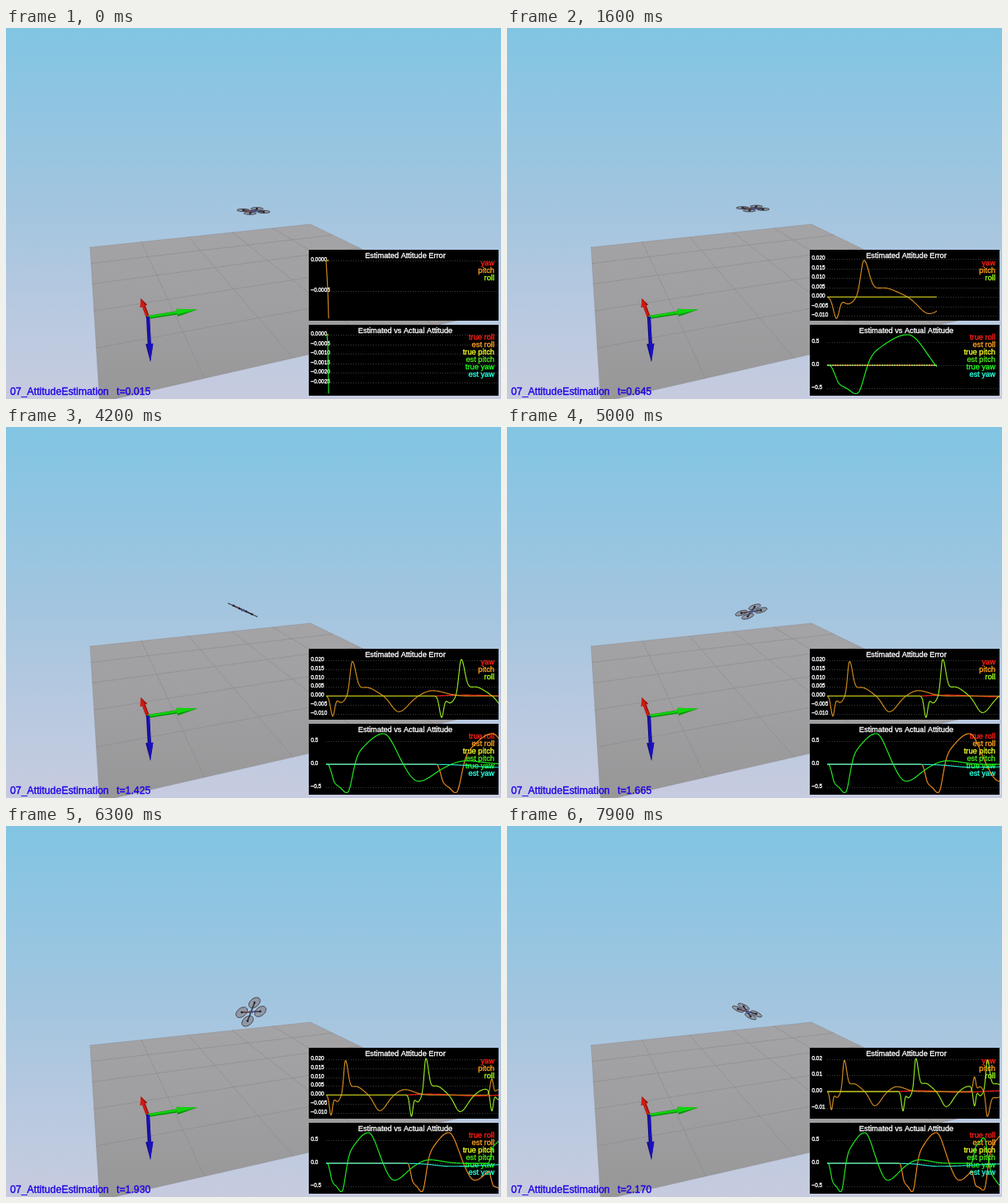
An HTML page with a canvas that plays this animation: 600 px wide and 450 px high, repeating every 8000 ms.

```html
<!DOCTYPE html>
<html lang="en">
<head>
<meta charset="utf-8">
<title>Attitude estimation</title>
<style>
  html, body { margin: 0; width: 100%; height: 100%; overflow: hidden; }
  canvas { display: block; width: 600px; height: 450px; }
</style>
</head>
<body>
<canvas id="stage" width="600" height="450"></canvas>
<script>
const ctx = document.getElementById('stage').getContext('2d');
const FONT = '"Liberation Sans", Arial, sans-serif';
const LOOP = 8000, STEP = 100;
const RED = '#ff1e14', ORANGE = '#ffa01e', LIME = '#a0ff1e',
      YELLOW = '#f0ff28', GREEN = '#1eff1e', CYAN = '#28ffdc', BLUE = '#1e00e6';

// Bell of height 1 at mid, with separate widths before and after it.
function bump(t, mid, before, after = before) {
  return Math.exp(-(((t - mid) / (t < mid ? before : after)) ** 2));
}

// Response to one attitude kick: estimation error and angle.
function errorKick(t) {
  if (t <= 0) return 0;
  return -.011 * bump(t, .055, .0255, .022) - .0038 * bump(t, .125, .045)
    + .0177 * bump(t, .216, .026, .041) + .0048 * bump(t, .33, .11)
    - .0088 * bump(t, .6, .085, .11) + .003 * bump(t, .88, .11, .14);
}

function angleKick(t) {
  if (t <= 0) return 0;
  const onset = 1 - Math.exp(-((t / .0253) ** 4));
  return onset * (-.25 * bump(t, .07, .03, .05) - .72 * bump(t, .178, .09, .055)
    + .67 * bump(t, .475, .222, .128) - .37 * bump(t, .76, .12, .18)
    + .08 * bump(t, 1.15, .13, .2));
}

// Pitch is kicked first, then roll, then both in opposite directions.
const pitchError = t => errorKick(t) - .8 * errorKick(t - 1.8);
const rollError = t => 1.06 * errorKick(t - .9) + errorKick(t - 1.8);
const yawError = t => t < .9 ? 0 : .0005 * Math.sin(6 * (t - .9));
const pitch = t => angleKick(t) - .9 * angleKick(t - 1.8);
const roll = t => angleKick(t - .9) + angleKick(t - 1.8);
const yaw = t => t < .9 ? 0 : -.065 * bump(t, 1.4, .25, .6);

// Drone centre by simulated time.
const flight = [[0, 300, 222], [.645, 298, 219], [1.125, 295, 223],
  [1.425, 287, 222], [1.665, 296, 224], [1.93, 297, 225.5], [2.18, 291, 225]];

function dronePosition(t) {
  const i = Math.max(1, flight.findIndex(key => key[0] >= t));
  const [t0, x0, y0] = flight[i - 1], [t1, x1, y1] = flight[i];
  const s = (t - t0) / (t1 - t0), ease = s * s * (3 - 2 * s);
  return [x0 + (x1 - x0) * ease, y0 + (y1 - y0) * ease];
}

// Simulated seconds: the playback slows down in stages.
function simTime(frame) {
  const part = (from, to, rate) => Math.max(0, Math.min(frame, to) - from) * rate;
  return .015 + part(0, 10, .045) + part(10, 54, .03) + part(54, 55, .025) + part(55, 80, .015);
}

function text(str, x, y, size, color, align = 'left') {
  ctx.font = `${size}px ${FONT}`;
  ctx.fillStyle = ctx.strokeStyle = color;
  ctx.textAlign = align;
  ctx.lineWidth = .35;
  ctx.fillText(str, x, y);
  ctx.strokeText(str, x, y);
}

function line(points, color, width = 1) {
  ctx.beginPath();
  points.forEach(([x, y]) => ctx.lineTo(x, y));
  ctx.strokeStyle = color;
  ctx.lineWidth = width;
  ctx.stroke();
}

function polygon(points, fill) {
  ctx.beginPath();
  points.forEach(([x, y]) => ctx.lineTo(x, y));
  ctx.closePath();
  ctx.fillStyle = fill;
  ctx.fill();
}

function gradient(y0, y1, ...colors) {
  const g = ctx.createLinearGradient(0, y0, 0, y1);
  colors.forEach((c, i) => g.addColorStop(i / (colors.length - 1), c));
  return g;
}

// Perspective map of the unit square onto the corners a, b, c, d.
function perspective([ax, ay], [bx, by], [cx, cy], [dx, dy]) {
  const x1 = bx - cx, x2 = dx - cx, x3 = ax - bx + cx - dx;
  const y1 = by - cy, y2 = dy - cy, y3 = ay - by + cy - dy;
  const den = x1 * y2 - x2 * y1;
  const g = (x3 * y2 - x2 * y3) / den, h = (x1 * y3 - x3 * y1) / den;
  return (u, v) => {
    const w = 1 + g * u + h * v;
    return [(ax + (bx - ax + g * bx) * u + (dx - ax + h * dx) * v) / w,
            (ay + (by - ay + g * by) * u + (dy - ay + h * dy) * v) / w];
  };
}
const floorPoint = perspective([102, 266], [369, 238], [590, 345], [113.5, 454]);

function drawScene() {
  ctx.fillStyle = gradient(0, 450, '#81c5e3', '#92c5e1', '#a4c5df', '#b7c9e0', '#c7cbdf');
  ctx.fillRect(0, 0, 600, 450);
  polygon([floorPoint(0, 0), floorPoint(1, 0), floorPoint(1, 1), floorPoint(0, 1)],
    gradient(238, 450, '#a4a3a6', '#9f9ea0', '#989798'));
  for (let i = 0; i <= 5; i++) {
    const k = i / 5;
    ctx.setLineDash(i % 5 ? [2, 1] : [1, 1]);
    line([floorPoint(k, 0), floorPoint(k, 1)], '#87878a', .8);
    line([floorPoint(0, k), floorPoint(1, k)], '#87878a', .8);
  }
  ctx.setLineDash([]);
}

function arrow(x, y, tipX, tipY, head, color, shade) {
  const len = Math.hypot(tipX - x, tipY - y);
  const ux = (tipX - x) / len, uy = (tipY - y) / len;
  const bx = tipX - ux * head, by = tipY - uy * head;
  const side = k => [bx - uy * k, by + ux * k];
  line([[x, y], [bx, by]], shade, 4.2);
  line([[x + uy * .6, y - ux * .6], [bx + uy * .6, by - ux * .6]], color, 2.4);
  polygon([side(4.6), [tipX, tipY], side(-4.6)], shade);
  polygon([side(2), [tipX, tipY], side(-4.6)], color);
}

function drawAxes() {
  arrow(172, 351, 163.5, 328, 10, '#d21a10', '#96100c');
  arrow(172, 351, 232, 341.5, 25, '#10d40c', '#0a940a');
  arrow(172, 350, 175, 405, 22, '#1a10be', '#140c84');
}

function drawDrone(t) {
  const [cx, cy] = dronePosition(t), r = roll(t), p = pitch(t);
  const ax = 12.5 - 4 * r * r, ay = 1 + 7.3 * r + 5 * p;
  const bx = 4.2, by = -2.7 + 8.3 * r - 8 * p;
  const at = (u, v) => [cx + ax * u + bx * v, cy + ay * u + by * v];
  const rotors = [[0, 1], [-1, 0], [1, 0], [0, -1]];
  for (const [u, v] of rotors) {
    const ring = Array.from({ length: 28 }, (_, i) => {
      const a = i * Math.PI / 14;
      return at(u + .57 * Math.cos(a), v + .57 * Math.sin(a));
    });
    polygon(ring, 'rgba(140,140,150,.8)');
    line([...ring, ring[0]], '#3c3c44', .9);
  }
  line([at(-1, 0), at(1, 0)], '#35353f', 1.5);
  line([at(0, -1), at(0, 1)], '#35353f', 1.5);
  line([at(-.7, 0), at(-.3, 0)], '#8c3c32', 1.2);
  line([at(.15, 0), at(.5, 0)], '#484890', 1.3);
  ctx.fillStyle = '#22222a';
  for (const [u, v] of rotors) {
    const [x, y] = at(u, v);
    ctx.fillRect(x - 1.1, y - 1.3, 2.2, 2.4);
  }
  ctx.fillStyle = '#50507c';
  ctx.fillRect(cx - 2, cy - 1.2, 4, 2.6);
}

// Steps run 1, 5, 10, 50, ... until at most seven fit.
function tickStep(range) {
  let step = 1e-5;
  for (let i = 0; range / step > 7; i++) step *= i % 2 ? 2 : 5;
  return step;
}

const charts = [
  {
    title: 'Estimated Attitude Error', y: 269, top: 282, bottom: 352.3, legendY: 288,
    legend: [['yaw', RED], ['pitch', ORANGE], ['roll', LIME]],
    series: [[yawError, '#ff1e14'], [pitchError, '#d28c1e'], [rollError, '#96e61e']]
  },
  {
    title: 'Estimated vs Actual Attitude', y: 360, top: 372, bottom: 443.5, legendY: 378,
    legend: [['true roll', RED], ['est roll', ORANGE], ['true pitch', YELLOW],
             ['est pitch', '#50e61e'], ['true yaw', GREEN], ['est yaw', CYAN]],
    series: [[roll, '#f08c1e'], [pitch, '#1ef01e'], [yaw, '#28e6c8']]
  }
];

function drawChart(chart, t) {
  const { top, bottom, series } = chart;
  const times = [];
  for (let s = 0; s < t - 1e-6; s += .005) times.push(s);
  times.push(t);
  const data = series.map(([f]) => times.map(f));
  const all = data.flat();
  const max = Math.max(...all), min = Math.min(...all);
  const px = s => 388 + s * 209 / Math.max(t, 1.014);
  const py = v => top + (max - v) / (max - min) * (bottom - top);

  ctx.fillStyle = '#000';
  ctx.fillRect(367, chart.y, 230, 86);

  const step = tickStep(max - min);
  const digits = Math.ceil(-Math.log10(step) - 1e-6);
  for (let i = Math.floor(min / step); i <= Math.ceil(max / step); i++) {
    const y = py(i * step);
    if (y < top - 4 || y > bottom - 2.5) continue;
    ctx.setLineDash([1, 2]);
    line([[388, Math.round(y) + .5], [597, Math.round(y) + .5]], '#3c3c3c');
    ctx.setLineDash([]);
    const label = (i < 0 ? '−' : '') + Math.abs(i * step).toFixed(digits);
    text(label, 369.5, y + 1, 6.4, '#fff');
  }

  text(chart.title, 484, chart.y + 9.7, 9.2, '#fff', 'center');
  chart.legend.forEach(([name, color], i) =>
    text(name, 592, chart.legendY + i * 8.9, 9.3, color, 'right'));

  ctx.save();
  ctx.beginPath();
  ctx.rect(367, chart.y, 230, 86);
  ctx.clip();
  ctx.lineJoin = 'round';
  series.forEach(([f, color], k) => {
    const early = f === yaw && t < .9;
    if (early) ctx.setLineDash([2, 1]);
    line(times.map((s, i) => [px(s), py(data[k][i])]), early ? '#a0e68c' : color, 1.15);
    ctx.setLineDash([]);
  });
  ctx.restore();
}

let shown = -1;
function draw(now) {
  const frame = Math.floor(now % LOOP / STEP);
  if (frame === shown) return;
  shown = frame;
  const t = simTime(frame);
  drawScene();
  drawDrone(t);
  drawAxes();
  charts.forEach(chart => drawChart(chart, t));
  text('07_AttitudeEstimation', 5, 445, 12.3, BLUE);
  text('t=' + t.toFixed(3), 134, 445, 12.3, BLUE);
}

const start = performance.now();
function tick() {
  draw(performance.now() - start);
  requestAnimationFrame(tick);
}
tick();
</script>
</body>
</html>
```
